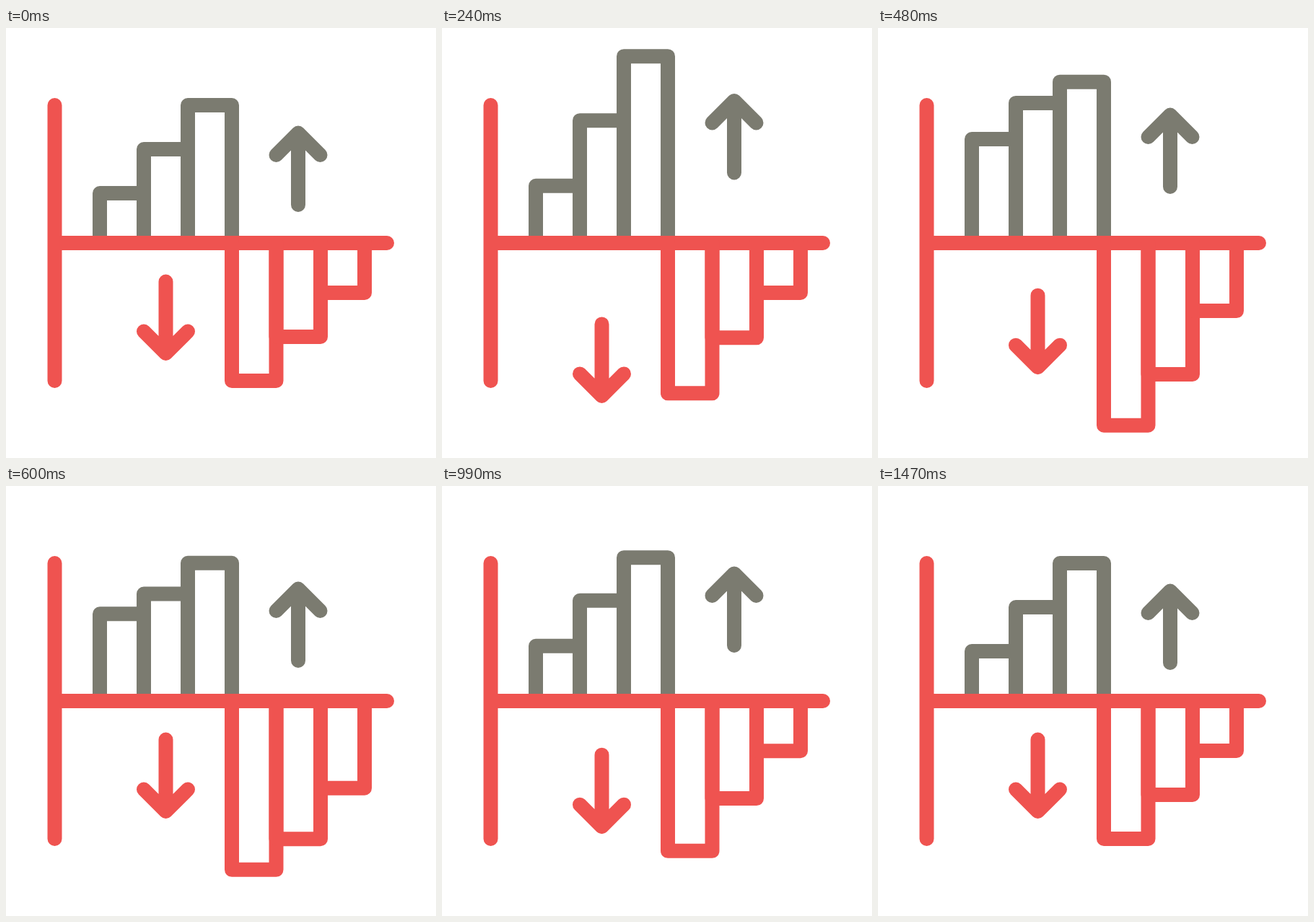
An HTML page that plays this animation: 596 px wide and 596 px high, repeating every 1500 ms.

```html
<!DOCTYPE html>
<html lang="en">
<head>
<meta charset="utf-8">
<title>Bars up and down</title>
<style>
html, body { margin: 0; width: 100%; height: 100%; overflow: hidden; background: #fff; }
svg { display: block; width: 100%; height: 100%; }
g { fill: none; stroke-width: 20; stroke-linecap: round; stroke-linejoin: round; }
</style>
</head>
<body>
<svg viewBox="0 0 596 596">
  <g id="up" stroke="#7b7b70"></g>
  <g id="down" stroke="#ef5350">
    <path d="M67.5 107V489M67.5 298H528"/>
  </g>
</svg>
<script>
const LOOP = 1500, STEP = 30, BASE = 298;

// Two bounces as [time, offset] stops, eased between neighbours.
const bounce = (start, top, a, rest, top2, b, end, hold = 0) =>
  [[start, 0], [top, a], [top + hold, a], [rest, 0], [top2, b], [end, 0]];
const rise = delay =>
  bounce(delay, delay + 300, 75, delay + 610, delay + 920, 9.3, delay + 1190, 25);

function offset(stops, t) {
  if (t <= stops[0][0]) return 0;
  for (let i = 1; i < stops.length; i++) {
    const [t0, v0] = stops[i - 1], [t1, v1] = stops[i];
    if (t < t1) return v0 + (v1 - v0) * (1 - Math.cos(Math.PI * (t - t0) / (t1 - t0))) / 2;
  }
  return 0;
}

const bar = (x0, x1, y, dir) => d => `M${x0} ${BASE}V${y + dir * d}H${x1}V${BASE}`;
const arrow = (x, tip, dir) => d => {
  const y = tip + dir * d, wing = y - dir * 30.5;
  return `M${x} ${y - dir * 99.5}V${y}M${x - 30.5} ${wing}L${x} ${y}L${x + 30.5} ${wing}`;
};

const parts = [
  ["up", bar(130, 191, 229, -1), rise(168)],
  ["up", bar(191, 252, 168, -1), rise(84)],
  ["up", bar(252, 313, 107, -1), rise(0)],
  ["up", arrow(405, 145.5, -1), bounce(0, 305, 50, 655, 912, 29, 1200)],
  ["down", bar(313, 374.5, 489, 1), bounce(100, 495, 62, 775, 1050, 19, 1280)],
  ["down", bar(374.5, 436, 428, 1), bounce(205, 578, 62, 885, 1135, 13.5, 1380)],
  ["down", bar(436, 497, 367, 1), bounce(300, 710, 62, 960, 1215, 7.3, 1450)],
  ["down", arrow(221.5, 451, 1), bounce(0, 280, 62, 600, 880, 28, 1215)]
].map(([group, shape, stops]) => {
  const path = document.createElementNS("http://www.w3.org/2000/svg", "path");
  document.getElementById(group).append(path);
  return { path, shape, stops };
});
// The up arrow rests a little later after its first bounce.
parts[3].stops.splice(4, 0, [682, 0]);

function draw(t) {
  for (const { path, shape, stops } of parts) path.setAttribute("d", shape(offset(stops, t)));
}

const begin = performance.now();
function tick() {
  const t = (performance.now() - begin) % LOOP;
  draw(Math.floor(t / STEP) * STEP);
  requestAnimationFrame(tick);
}
tick();
</script>
</body>
</html>
```
